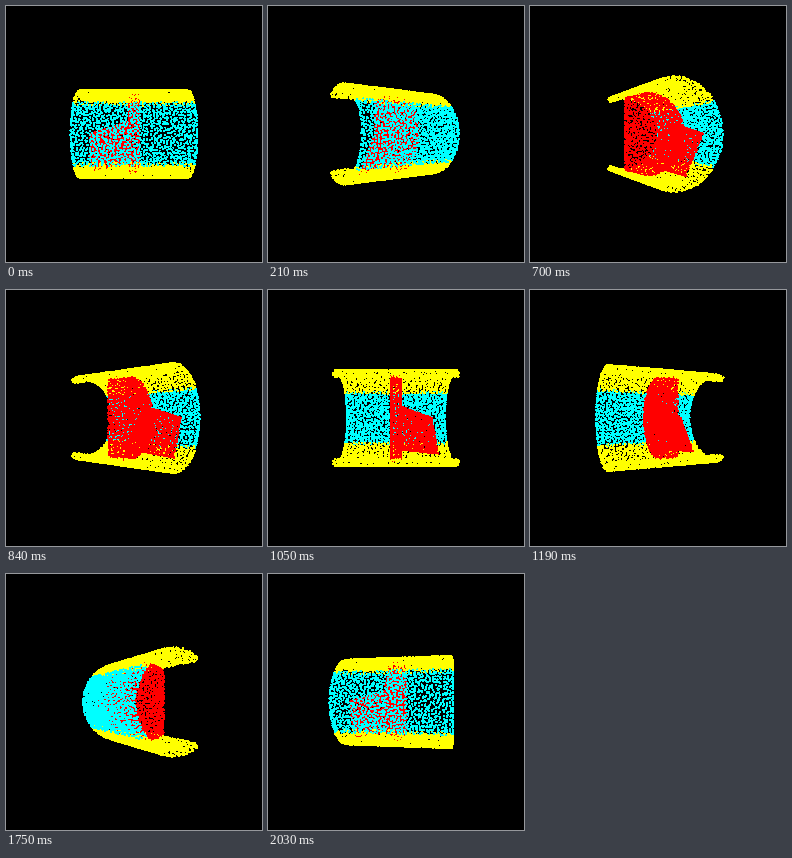
Write a matplotlib script that moves like this. It is 256 px wide and 256 px high and loops after 2100 ms.

```python
import numpy as np
import matplotlib.pyplot as plt
from matplotlib.animation import FuncAnimation

SIZE, DPI = 256, 100
FRAMES, STEP = 30, 70
CAM = 252                    # camera distance, in pixels at the pivot depth
HALF = 55                    # half length of the shell
R_OUT, R_IN, MID_Z = 45.5, 40.8, -11
OPEN = np.radians(120)       # the shell spans -OPEN..OPEN
SPLIT = np.radians(39.5)     # where cyan turns into yellow
FLAT_Z, THICK = -34, 4.3     # flat side and half thickness of the plate
DOT = 1.1                    # aliased dots fill every pixel they touch

YELLOW, CYAN, RED = (1, 1, 0), (0, 1, 1), (1, 0, 0)
rng = np.random.default_rng(7)


def patch(surface, width, height, gap=3.0):
    """Scatter points evenly over surface(u, v), with u and v in 0..1."""
    nu, nv = max(1, round(width / gap)), max(1, round(height / gap))
    u, v = np.meshgrid(np.arange(nu) + 0.5, np.arange(nv) + 0.5)
    u = (u + rng.uniform(-0.4, 0.4, u.shape)) / nu
    v = (v + rng.uniform(-0.4, 0.4, v.shape)) / nv
    return surface(u.ravel(), v.ravel())


def ring(x, r, a):
    x, r, a = np.broadcast_arrays(x, r, a)
    return np.column_stack([x, r * np.sin(a), MID_Z + r * np.cos(a)])


def sweep(u, limit=OPEN):
    return (2 * u - 1) * limit


def along(v, half=HALF):
    return (2 * v - 1) * half


def quad(a, b, c, d, gap=2.4):
    a, b, c, d = (np.array(p, float) for p in (a, b, c, d))

    def surface(u, v):
        u, v = u[:, None], v[:, None]
        return (1 - v) * ((1 - u) * a + u * b) + v * ((1 - u) * d + u * c)

    width = max(np.linalg.norm(b - a), np.linalg.norm(c - d))
    height = max(np.linalg.norm(d - a), np.linalg.norm(c - b))
    return patch(surface, width, height, gap)


def make_shell():
    wall = R_OUT - R_IN
    parts = [patch(lambda u, v, r=r: ring(along(v), r, sweep(u)),
                   2 * OPEN * r, 2 * HALF) for r in (R_OUT, R_IN)]
    for side in (-1, 1):
        parts.append(patch(
            lambda u, v: ring(side * HALF, R_IN + v * wall, sweep(u)),
            2 * OPEN * R_OUT, wall, 2.4))
        parts.append(patch(
            lambda u, v: ring(along(u), R_IN + v * wall, side * OPEN),
            2 * HALF, wall, 2.4))
    pts = np.vstack(parts)
    angle = np.abs(np.arctan2(pts[:, 1], pts[:, 2] - MID_Z))
    return pts, np.where((angle < SPLIT)[:, None], CYAN, YELLOW)


def make_plate():
    limit = np.arccos((FLAT_Z - MID_Z) / R_IN)
    chord = R_IN * np.sin(limit)
    top = MID_Z + R_IN
    parts = [patch(lambda u, v: ring(along(v, THICK), R_IN - 0.6, sweep(u, limit)),
                   2 * limit * R_IN, 2 * THICK, 2.4)]
    for x in (-THICK, THICK):
        face = quad((x, -R_IN, FLAT_Z), (x, R_IN, FLAT_Z),
                    (x, R_IN, top), (x, -R_IN, top), 2.6)
        parts.append(face[np.hypot(face[:, 1], face[:, 2] - MID_Z) < R_IN])
    parts.append(quad((-THICK, -chord, FLAT_Z), (-THICK, chord, FLAT_Z),
                      (THICK, chord, FLAT_Z), (THICK, -chord, FLAT_Z)))
    return np.vstack(parts)


def make_wedge():
    tip_a, tip_b = (-40, 0, 25), (-43, 36, 3)
    c1, d1 = (-4, -8, 20), (-4, 31, -6)
    c2, d2 = (-4, -13, 9), (-4, 28, -20)
    return np.vstack([quad(tip_a, tip_b, d1, c1), quad(tip_a, tip_b, d2, c2),
                      quad(tip_a, tip_a, c2, c1), quad(tip_b, tip_b, d2, d1)])


shell, shell_rgb = make_shell()
red = np.vstack([make_plate(), make_wedge()])
points = np.vstack([shell, red])
colors = np.vstack([shell_rgb, np.tile(RED, (len(red), 1))])

fig = plt.figure(figsize=(SIZE / DPI, SIZE / DPI), dpi=DPI, facecolor="black")
ax = fig.add_axes([0, 0, 1, 1])
ax.set(xlim=(0, SIZE), ylim=(SIZE, 0))
ax.axis("off")
cloud = ax.scatter(points[:, 0], points[:, 1], s=(DOT * 72 / DPI) ** 2,
                   c=colors, linewidths=0, antialiased=False)


def draw(i):
    t = 2 * np.pi * i / FRAMES
    x, y, z = points.T
    depth = z * np.cos(t) - x * np.sin(t)
    scale = CAM / (CAM - depth)
    sx = SIZE / 2 + (x * np.cos(t) + z * np.sin(t)) * scale
    sy = SIZE / 2 + y * scale
    order = np.argsort(depth)
    cloud.set_offsets(np.column_stack([sx, sy])[order])
    cloud.set_facecolors(colors[order])
    return (cloud,)


anim = FuncAnimation(fig, draw, frames=FRAMES, interval=STEP, repeat=True,
                     repeat_delay=0)
plt.show()
```
